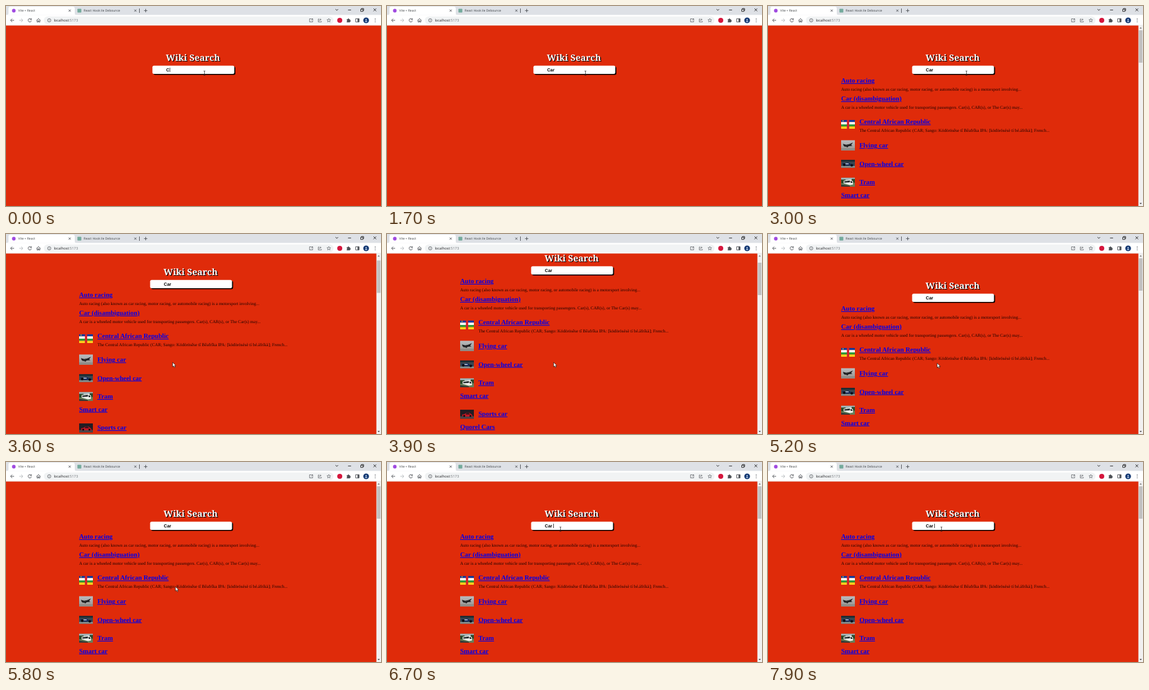
An HTML page that plays this animation: 600 px wide and 321 px high, repeating every 8 s.

```html
<!DOCTYPE html>
<html lang="en">
<head>
<meta charset="utf-8">
<title>Wiki Search</title>
<style>
  html, body { margin: 0; width: 100%; height: 100%; overflow: hidden; background: #df2b0a; }
  svg { display: block; width: 600px; height: 321px; text-rendering: geometricPrecision; }
  .ui { font: 5px "Open Sans", "Noto Sans", sans-serif; fill: #3c4043; }
  .url { font-size: 5.75px; fill: #202124; }
  .title { font: bold 14.1px "Noto Serif", "Liberation Serif", serif; }
  .field { font: bold 7.03px "Liberation Sans", sans-serif; }
  .link { font: bold 10.54px "Liberation Serif", serif; fill: #0000ee; text-decoration: underline; }
  .desc { font: 7.03px "Liberation Serif", serif; fill: #1c0300; }
  .icon { fill: none; stroke: #4d5156; stroke-width: .9; }
</style>
</head>
<body>
<svg viewBox="0 0 600 321">
  <defs>
    <linearGradient id="sky" x2="0" y2="1">
      <stop stop-color="#b9bcc0"/><stop offset="1" stop-color="#98958f"/>
    </linearGradient>
    <clipPath id="thumb"><rect width="22" height="17"/></clipPath>
  </defs>
  <rect width="600" height="321" fill="#df2b0a"/>

  <g id="page">
    <g id="head">
      <text class="title" x="257" y="89.2">Wiki Search</text>
      <text class="title" x="255.8" y="88" fill="#fff">Wiki Search</text>
      <rect x="236" y="97.3" width="131" height="13.2" rx="2.5"/>
      <rect x="234.3" y="95.8" width="131" height="13.2" rx="2.5" fill="#fff"/>
      <text class="field" id="query" x="256.3" y="105"></text>
      <rect id="caret" y="99" width=".7" height="7"/>
    </g>
    <g id="results"></g>
  </g>

  <g id="bar">
    <rect x="592.6" y="31" width="7.4" height="290" fill="#f1f1f1"/>
    <rect id="grip" x="593.4" y="39" width="5.8" height="52" fill="#c1c1c1"/>
    <path d="M594.5 36.3l1.8-2.2 1.8 2.2z" fill="#777"/>
    <path d="M594.5 316l1.8 2.2 1.8-2.2z" fill="#505050"/>
  </g>

  <g id="browser">
    <rect width="600" height="15" fill="#dee1e6"/>
    <path d="M1 14.5q3 0 3-3V4q0-3 3-3h100q3 0 3 3v7.5q0 3 3 3z" fill="#fff"/>
    <rect y="14.3" width="600" height="16.9" fill="#fff"/>
    <rect y="30.7" width="600" height=".5" fill="#d9dbdf"/>
    <rect x="60.5" y="16.8" width="463.5" height="12.4" rx="6.2" fill="#f1f3f4"/>
    <circle cx="12.5" cy="7.5" r="2.9" fill="#a04be0"/>
    <rect x="114.3" y="4.4" width="6.2" height="6.2" rx=".8" fill="#74aa9c"/>
    <text class="ui" x="19.5" y="9.3">Vite + React</text>
    <text class="ui" x="124.3" y="9.3">React Hook ile Debounce</text>
    <text class="ui url" x="76.4" y="25.1">localhost<tspan fill="#6b6f74">:5173</tspan></text>
    <g class="icon">
      <path d="M100.2 5.7l3.4 3.4m0-3.4l-3.4 3.4M205.3 5.7l3.4 3.4m0-3.4l-3.4 3.4M213.5 4v7M220.8 7.4h5.4m-2.7-2.7v5.4"/>
      <path d="M527.2 5l2.1 2.1 2.1-2.1M547.3 6.4h4.8M588 4l4.4 4.4m0-4.4L588 8.4" stroke="#222"/>
      <path d="M567.5 5.2h3.6v3.5h-3.6zM568.6 5V4h3.6v3.6h-1" stroke="#222"/>
      <path d="M13 23H7.4m2.6-2.7L7.3 23l2.7 2.7"/>
      <path d="M21.3 23h5.6m-2.6-2.7L27 23l-2.7 2.7" stroke="#b5b8bc"/>
      <path d="M40.3 21.4A2.7 2.7 0 1 0 40.7 23.6M40.7 19.8v2.1h-2.2"/>
      <path d="M48.8 23.2l3.2-3 3.2 3M49.8 22.5v3.3h1.5v-2h1.4v2h1.5v-3.3"/>
      <circle cx="69.2" cy="23" r="2.7" stroke-width=".7"/><path d="M69.2 22.6v1.9m0-3.2v.7" stroke-width=".7"/>
      <path d="M488 20.5h-2.3v5h5v-2.2m-2.3-2.8h2.4v2.4m0-2.4l-2.9 2.9" stroke-width=".7"/>
      <path d="M501.3 20.9h-1.6v4.7h5v-1.4m-3.8-.3q.3-2.2 3-2.2m-1.2-1.4l1.5 1.4-1.5 1.4" stroke-width=".7"/>
      <path d="M516.5 20l.9 1.9 2 .2-1.5 1.4.4 2.1-1.8-1.1-1.8 1.1.4-2.1-1.5-1.4 2-.2z" stroke-width=".7"/>
      <path d="M559.5 20.3h5.5v5.4h-5.5z"/>
    </g>
    <circle cx="534" cy="23" r="4" fill="#d5163c"/>
    <path d="M545.2 21.2h1.6a1.1 1.1 0 0 1 2.2 0h1.5v1.6a1.1 1.1 0 0 1 0 2.2v1.2h-5.3v-1.5a1.1 1.1 0 0 0 0-2z" fill="#4d5156"/>
    <rect x="562.4" y="20.3" width="2.6" height="5.4" fill="#4d5156"/>
    <circle cx="576.2" cy="23" r="4.6" fill="#153a73"/>
    <path d="M574.3 25.4q0-2 1.9-2t1.9 2zM575.1 21.9a1.1 1.1 0 1 0 2.2 0 1.1 1.1 0 1 0-2.2 0" fill="#b6cbe8"/>
    <path d="M590.2 20.1h1.1v1.1h-1.1zm0 2.4h1.1v1.1h-1.1zm0 2.4h1.1v1.1h-1.1z" fill="#4d5156"/>
  </g>

  <g id="mouse">
    <path id="arrow" d="M0 0v7.2l1.7-1.5 1.1 2.6 1.3-.6-1.1-2.5h2.2z" fill="#fff" stroke="#000" stroke-width=".6"/>
    <path id="beam" d="M-1.4-3.5h1q.4 0 .4.5V3q0 .5.4.5h1M1.4-3.5h-1Q0-3.5 0-3M0 3q0 .5-.4.5h-1" fill="none" stroke="#222" stroke-width=".7"/>
  </g>
</svg>
<script>
const $ = id => document.getElementById(id);
const shape = (d, fill) => `<path d="${d}" fill="${fill}"/>`;

// Thumbnails, 22 units wide
const pics = {
  flag: ['#13399b', '#fff', '#2d9a3b', '#ffd21c']
      .map((c, i) => shape(`M0 ${i * 3.6}h22v3.6h-22z`, c)).join('') +
    shape('M9.2 0h3.7v14.4h-3.7z', '#d8202a') + shape('M2.4 .7h1.4v1.8h-1.4z', '#ffd21c'),
  plane: shape('M0 0h22v16.5h-22z', 'url(#sky)') + shape('M0 13h22v3.5h-22z', '#8d8c88') +
    shape('M3 6l5 1.5 6-1.2 5-2.5-3 4 2 1.5-6 .5-2 2-3-1.8-3-.8z', '#1d1c1f') + shape('M5 10.2l12-5.5v.8l-11 5.5z', '#333'),
  racer: shape('M0 0h22v12.8h-22z', '#39474f') + shape('M0 0h22v3h-22z', '#1b2b32') + shape('M0 10h22v2.8h-22z', '#87908f') +
    shape('M2 5l5 1 4-2 4 2.5 5 1v2h-17z', '#182c5c') + shape('M7 6h5v1.2h-5z', '#d5dde4') +
    shape('M3 8a2 2 0 1 0 4 0 2 2 0 1 0-4 0M15 9a2 2 0 1 0 4 0 2 2 0 1 0-4 0', '#0b0d10'),
  tram: shape('M0 0h22v14.3h-22z', '#65805a') + shape('M0 0h22v4h-22z', '#a5b8bd') + shape('M0 3h7v6h-7zM17 2h5v6h-5z', '#2c4a2c') +
    shape('M4 5l11-2 4 3v5l-5 1-10-3z', '#eceee9') + shape('M5 6l9-1.5v3l-9 .5zM15 5l3 1.5v2l-3-.5z', '#20282b') +
    shape('M0 11l14 2v1.3h-14z', '#353a36'),
  sports: shape('M0 0h22v14.3h-22z', '#211c22') + shape('M0 10.5h22v3.8h-22z', '#4a454a') +
    shape('M3 8l4-1 3-2h5l4 3 1 3h-16z', '#bd1624') + shape('M10 5.6h4l2 1.8h-7z', '#15151c') +
    shape('M5 10a1.5 1.5 0 1 0 3 0 1.5 1.5 0 1 0-3 0M15 10a1.5 1.5 0 1 0 3 0 1.5 1.5 0 1 0-3 0', '#08080a')
};

// title, baseline, thumbnail, thumbnail top, description
const rows = [
  ['Auto racing', 123, '', 0, 'Auto racing (also known as car racing, motor racing, or automobile racing) is a motorsport involving...'],
  ['Car (disambiguation)', 152, '', 0, 'A car is a wheeled motor vehicle used for transporting passengers. Car(s), CAR(s), or The Car(s) may...'],
  ['Central African Republic', 189.2, 'flag', 182.7, 'The Central African Republic (CAR; Sango: Ködörösêse tî Bêafrîka IPA: [ködörösésè tí bé.áfríkà]; French...'],
  ['Flying car', 227.1, 'plane', 215.3],
  ['Open-wheel car', 256.5, 'racer', 246.8],
  ['Tram', 286, 'tram', 275.6],
  ['Smart car', 306.6],
  ['Sports car', 336, 'sports', 326],
  ['Quorel Cars', 356.8]
];
$('results').innerHTML = rows.map(([name, y, pic, top, desc]) => {
  const x = pic ? 146.2 : 117;
  return (pic ? `<g transform="translate(117 ${top})" clip-path="url(#thumb)">${pics[pic]}</g>` : '') +
    `<text class="link" x="${x}" y="${y}">${name}</text>` +
    (desc ? `<text class="desc" x="${x}" y="${y + 13.2}">${desc}</text>` : '');
}).join('');

// Steps of [time, value, ...]
const typed = [[0, 'C'], [300, 'Ca'], [600, 'Car'], [6600, 'Car ']];
const carets = [[0, 261.8], [300, 265.6], [600, 268.6], [1100, 0], [1200, 268.6], [1700, 0], [6500, 268.6], [6600, 269.9], [7200, 0], [7700, 269.9]];
const moves = [[0, 317.5, 107.8], [3000, 317.5, 107.8], [3500, 266.6, 206], [4700, 266.6, 206], [5100, 270.6, 207.3], [5700, 270.6, 207.3], [6300, 277.5, 107.8], [8000, 277.5, 107.8]];
const scrolls = [[0, 0], [3500, 0], [3700, 44], [4800, 44], [5000, 0], [8000, 0]];

const hold = (steps, t) => steps.filter(s => s[0] <= t).pop()[1];
function ease(steps, t, col = 1) {
  const i = Math.max(1, steps.findIndex(s => s[0] > t));
  const a = steps[i - 1], b = steps[i], p = (t - a[0]) / (b[0] - a[0]);
  return a[col] + (b[col] - a[col]) * p * p * (3 - 2 * p);
}
const show = (id, on) => $(id).setAttribute('visibility', on ? 'visible' : 'hidden');
const move = (id, x, y) => $(id).setAttribute('transform', `translate(${x} ${y})`);

function draw(t) {
  const found = t >= 2200, scroll = ease(scrolls, t);
  const x = ease(moves, t), y = ease(moves, t, 2), caret = hold(carets, t);
  $('query').textContent = hold(typed, t);
  show('caret', caret);
  $('caret').setAttribute('x', caret);
  show('results', found);
  show('bar', found);
  move('head', found ? -3.7 : 0, 0);
  move('page', 0, -scroll);
  move('grip', 0, scroll * .16);
  const inField = y + scroll > 95 && y + scroll < 110;
  show('beam', inField);
  show('arrow', !inField);
  move('mouse', x, y);
}

const start = performance.now(), loop = 8000, step = 100;
function tick() {
  const t = (performance.now() - start) % loop;
  draw(Math.floor(t / step) * step);
  requestAnimationFrame(tick);
}
tick();
</script>
</body>
</html>
```
